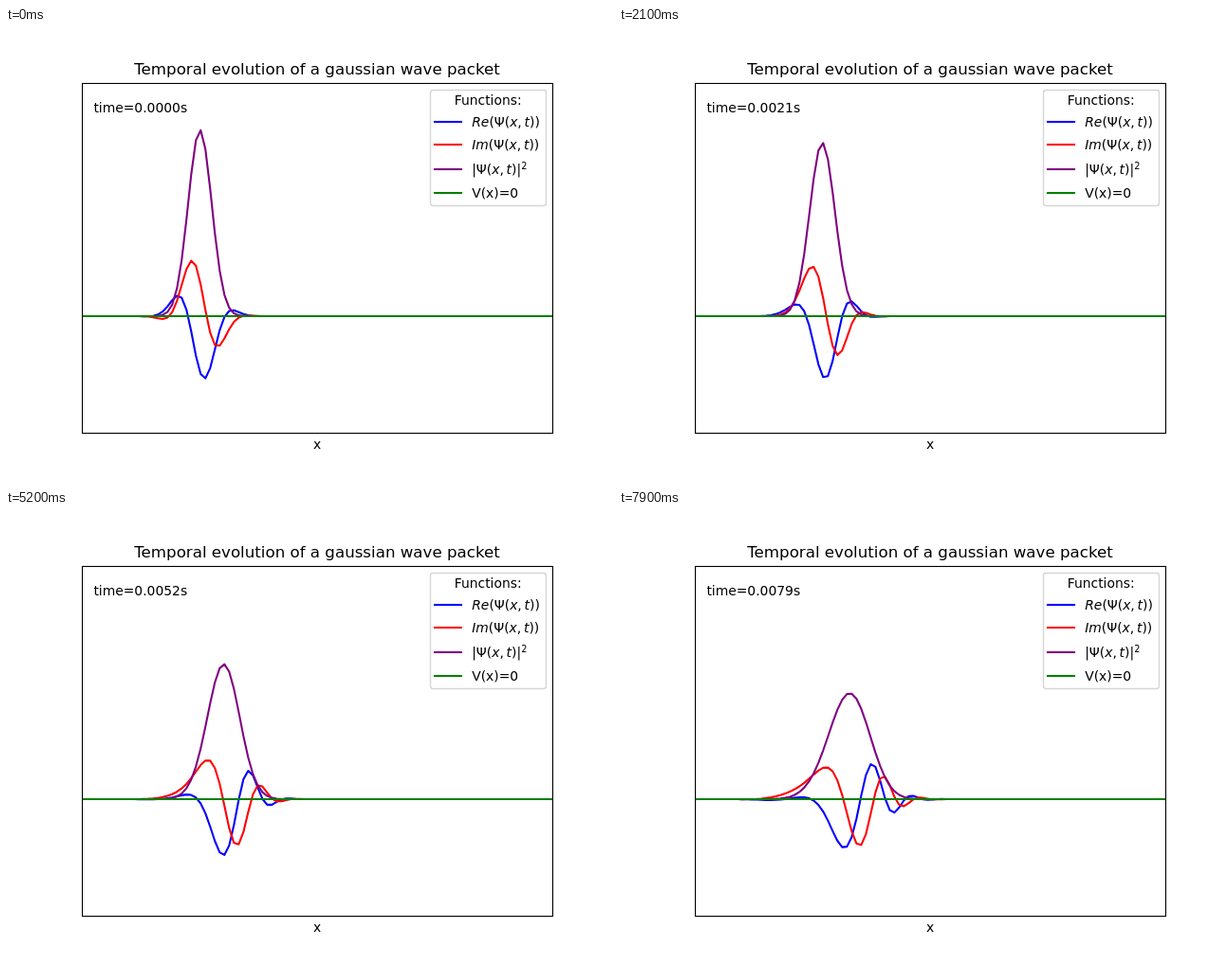
These frames come from a looping animation (640x480 px, 8 s). An HTML page:

```html
<!DOCTYPE html>
<html lang="en">
<head>
<meta charset="utf-8">
<title>Gaussian wave packet</title>
<style>
  html, body { margin: 0; width: 100%; height: 100%; overflow: hidden; background: #fff; }
  svg { display: block; width: 640px; height: 480px; }
  text { font: 13.889px "DejaVu Sans", sans-serif; white-space: pre; }
  .title { font-size: 16.667px; }
  .mid { text-anchor: middle; }
  .it { font-style: oblique; }
  .sup { font-size: 9.722px; }
  .line { fill: none; stroke-width: 2.083; stroke-linejoin: round; }
</style>
</head>
<body>
<svg viewBox="0 0 640 480">
  <text class="title mid" x="328" y="49">Temporal evolution of a gaussian wave packet</text>
  <text class="mid" x="328" y="444">x</text>
  <g class="line">
    <polyline id="re" stroke="blue"/>
    <polyline id="im" stroke="red"/>
    <polyline id="prob" stroke="purple"/>
    <path d="M80 304H576" stroke="green"/>
  </g>
  <rect x="80.5" y="58.5" width="496" height="369" fill="none" stroke="#000" stroke-width="1.11"/>
  <text id="clock" x="92.4" y="89"></text>

  <rect x="447.5" y="65.5" width="122" height="122" rx="2.78" fill="#fff" stroke="#ccc" stroke-width="1.389" opacity=".8"/>
  <text class="mid" x="508.2" y="81">Functions:</text>
  <g class="line" stroke-linecap="square">
    <path d="M452 99H480" stroke="blue"/>
    <path d="M452 123H480" stroke="red"/>
    <path d="M452 149H480" stroke="purple"/>
    <path d="M452 174H480" stroke="green"/>
  </g>
  <text x="491.2" y="104"><tspan class="it">Re</tspan>(Ψ(<tspan class="it">x</tspan>,&#8201;<tspan class="it">t</tspan>))</text>
  <text x="491.2" y="128"><tspan class="it">Im</tspan>(Ψ(<tspan class="it">x</tspan>,&#8201;<tspan class="it">t</tspan>))</text>
  <text x="491.2" y="154">|Ψ(<tspan class="it">x</tspan>,&#8201;<tspan class="it">t</tspan>)|<tspan class="sup" dy="-5">2</tspan></text>
  <text x="491.2" y="179">V(x)=0</text>
</svg>
<script>
const $ = id => document.getElementById(id);

// Free packet on a grid of 100 points over [-1, 1], with hbar = m = 1
const N = 100, DX = 2 / (N - 1), DT = 1e-4;
const X0 = -0.5, K0 = 20, SIGMA = 0.05;
const STEPS = 80, STEP_MS = 100;
const NORM = (2 * Math.PI * SIGMA ** 2) ** -0.25 * SIGMA / Math.sqrt(Math.PI);

// Plane waves with the energy of the finite-difference Laplacian
const waves = [];
for (let k = K0 - 60; k <= K0 + 60; k++) {
  waves.push({
    k,
    amp: NORM * Math.exp(-((SIGMA * (k - K0)) ** 2)),
    energy: (1 - Math.cos(k * DX)) / DX ** 2
  });
}

function psi(x, t) {
  let re = 0, im = 0;
  for (const { k, amp, energy } of waves) {
    const phase = k * (x - X0) + K0 * X0 - energy * t;
    re += amp * Math.cos(phase);
    im += amp * Math.sin(phase);
  }
  return [re, im];
}

function draw(step) {
  const curves = { re: [], im: [], prob: [] };
  for (let i = 0; i < N; i++) {
    const x = -1 + i * DX;
    const [re, im] = psi(x, (step + 1) * DT);
    const add = (id, v) =>
      curves[id].push(`${(328 + 248 * x).toFixed(2)},${(304 - 24.64 * v).toFixed(2)}`);
    add("re", re);
    add("im", im);
    add("prob", re * re + im * im);
  }
  for (const id in curves) $(id).setAttribute("points", curves[id].join(" "));
  $("clock").textContent = `time=${(step * DT).toFixed(4)}s`;
}

const start = performance.now();
let shown = -1;
function tick() {
  const step = Math.floor((performance.now() - start) / STEP_MS) % STEPS;
  if (step !== shown) draw(shown = step);
  requestAnimationFrame(tick);
}
tick();
</script>
</body>
</html>
```
